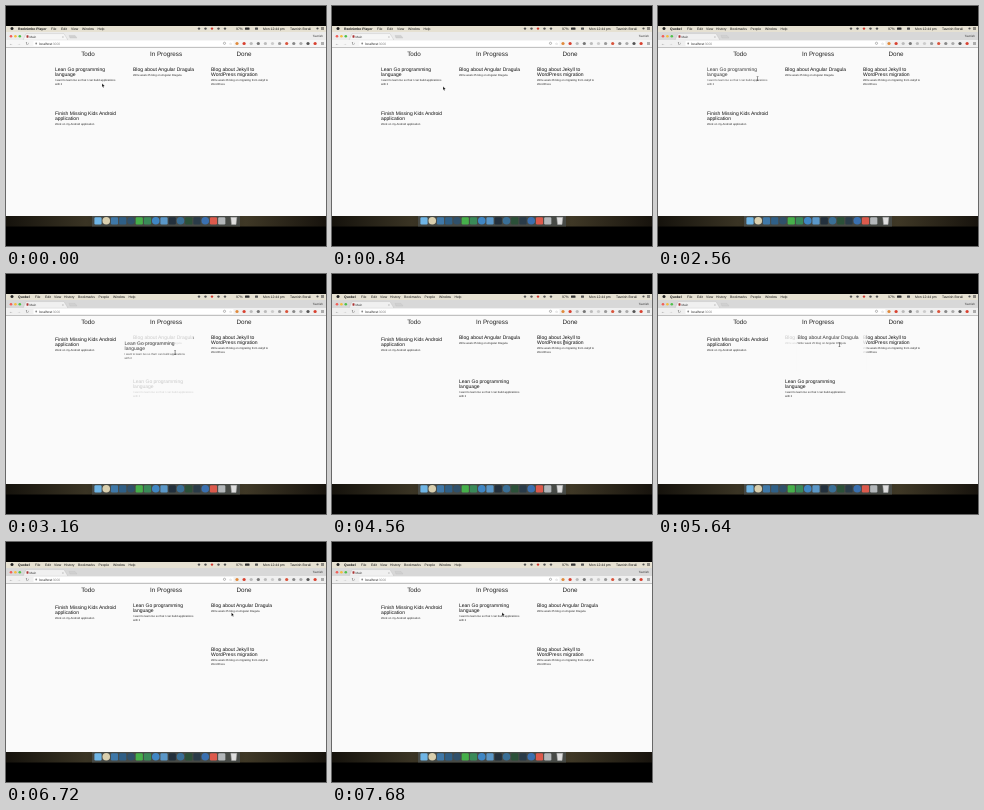
An HTML page with a canvas for the animation above (8000 ms loop, 320 px wide and 240 px high).

```html
<!DOCTYPE html>
<html lang="en">
<head>
<meta charset="utf-8">
<title>Drag and drop board</title>
<style>
html, body { margin: 0; height: 100%; overflow: hidden; background: #000; }
canvas { display: block; width: 320px; height: 240px; }
</style>
</head>
<body>
<canvas id="stage"></canvas>
<script>
const canvas = document.getElementById('stage');
const ratio = window.devicePixelRatio || 1;
canvas.width = 320 * ratio;
canvas.height = 240 * ratio;
const ctx = canvas.getContext('2d');
ctx.scale(ratio, ratio);
ctx.textRendering = 'geometricPrecision';

const LOOP = 8000, ACTIVATE = 880, SWAP_1 = 2770, SWAP_2 = 5760;
const PAGE = '#fafafa';

const go = { title: ['Lean Go programming', 'language'],
  note: ['I want to learn Go so that I can build applications', 'with it'] };
const kids = { title: ['Finish Missing Kids Android', 'application'],
  note: ['Work on my Android application'] };
const angular = { title: ['Blog about Angular Dragula'],
  note: ['Write week 25 blog on Angular Dragula'] };
const jekyll = { title: ['Blog about Jekyll to', 'WordPress migration'],
  note: ['Write week 26 blog on migrating from Jekyll to', 'WordPress'] };

const drags = [
  { card: go, from: 2520, to: 3480, home: [49, 63], grab: [99.5, 72.5] },
  { card: angular, from: 5440, to: 6480, home: [127, 63], grab: [169, 70] },
];

// time, x, y of the pointer
const path = [
  [40, 97, 79], [520, 112, 82], [840, 112, 82], [1480, 144, 80], [1760, 144, 80],
  [2520, 99.5, 72.5], [2600, 99.5, 72.5], [3140, 169, 78.5], [3400, 170, 78.5],
  [3800, 170, 78.5], [4320, 232, 68], [4560, 232, 68], [4680, 231, 69], [4840, 231, 69],
  [5280, 169, 70], [5480, 169, 70], [6020, 227, 72], [6280, 228, 72], [6640, 228, 72],
  [7440, 173, 73], [7680, 171, 72],
];

function pointerAt(t) {
  const next = path.findIndex(p => p[0] > t);
  if (next < 1) return path[next ? path.length - 1 : 0].slice(1);
  const [t0, x0, y0] = path[next - 1], [t1, x1, y1] = path[next];
  const u = (t - t0) / (t1 - t0), k = u * u * (3 - 2 * u);
  return [x0 + (x1 - x0) * k, y0 + (y1 - y0) * k];
}

function box(x, y, w, h, color, radius = 0) {
  ctx.fillStyle = color;
  ctx.beginPath();
  ctx.roundRect(x, y, w, h, radius);
  ctx.fill();
}

function dot(x, y, r, color) {
  ctx.fillStyle = color;
  ctx.beginPath();
  ctx.arc(x, y, r, 0, 7);
  ctx.fill();
}

function shape(points, fill, stroke, width = 0.5) {
  ctx.beginPath();
  points.forEach(([x, y]) => ctx.lineTo(x, y));
  ctx.closePath();
  ctx.fillStyle = fill;
  ctx.strokeStyle = stroke;
  ctx.lineWidth = width;
  ctx.fill();
  ctx.stroke();
}

// y is the middle of the line
function text(str, x, y, size, color = '#222', align = 'left', weight = '') {
  ctx.font = `${weight} ${size}px "Liberation Sans", Arial, sans-serif`;
  ctx.fillStyle = color;
  ctx.textAlign = align;
  ctx.fillText(str, x, y + size * 0.35);
}

function drawCard({ title, note }, x, y) {
  title.forEach((line, i) => text(line, x, y + i * 5.2, 5, '#111'));
  const noteY = y + 0.9 + title.length * 5.1;
  note.forEach((line, i) => text(line, x, noteY + i * 3.9, 2.8, '#222'));
}

function drawMenuBar(active) {
  box(0, 20, 320, 6, '#e6e1d2');
  dot(6, 22.6, 1.5, '#222');
  text(active ? 'Quobel' : 'Reelnimbo Player', 12, 22.6, 3.4, '#111', 'left', 'bold');
  const items = active
    ? [['File', 29], ['Edit', 39], ['View', 48], ['History', 58], ['Bookmarks', 72],
       ['People', 92.5], ['Window', 107], ['Help', 122.5]]
    : [['File', 45], ['Edit', 55], ['View', 65], ['Window', 76], ['Help', 91.5]];
  items.forEach(([label, x]) => text(label, x, 22.6, 3.4, '#111'));

  for (let i = 0; i < 5; i++) dot(193 + i * 6.5, 22.6, 1.2, i === 2 ? '#d0392f' : '#555');
  text('97%', 230, 22.6, 3.4, '#111');
  box(239, 21.4, 4.5, 2.4, '#333', 0.5);
  box(249, 21.4, 3, 2.4, '#555', 0.5);
  text('Mon 12:44 pm', 257, 22.6, 3.4, '#111');
  text('Tavnish Borali', 284, 22.6, 3.4, '#111');
  dot(311.5, 22.5, 1.1, '#555');
  for (let i = 0; i < 3; i++) box(315, 21.3 + i, 3, 0.5, '#333');
}

function drawBrowser(active) {
  box(0, 26, 320, 8, active ? '#d8d8d8' : '#ebebeb');
  ['#f25e57', '#f5bd3d', '#4fc14a'].forEach((c, i) => dot(5 + i * 4.4, 30.2, 1.3, c));
  const bar = active ? '#f0f0f0' : '#f6f6f6';
  shape([[17, 34.2], [20, 27.6], [58, 27.6], [62, 34.2]], bar, '#bbb', 0.4);
  box(20.5, 29.3, 2, 2.4, '#a33', 0.4);
  text('Main', 23.5, 30.6, 3.1, '#333');
  text('×', 56, 30.6, 3, '#666');
  shape([[64, 32], [63, 29.4], [69, 29.4], [71, 32]], '#d0d0d0', '#bbb', 0.3);
  text('Tavnish', 317, 30, 3, '#333', 'right');

  box(0, 34, 320, 7.4, bar);
  box(0, 41.2, 320, 0.4, '#bbb');
  text('←', 3, 37.5, 4, '#666');
  text('→', 11, 37.5, 4, '#aaa');
  text('↻', 19.5, 37.5, 4, '#666');
  box(27.5, 35.1, 200, 5, '#fff', 0.7);
  dot(30.2, 37.5, 0.9, '#888');
  text('localhost', 33, 37.6, 3.3, '#222');
  text(':3000', 45.8, 37.6, 3.3, '#888');
  text('☆', 223, 37.5, 3.5, '#777');
  ctx.strokeStyle = '#777';
  ctx.lineWidth = 0.5;
  ctx.beginPath();
  ctx.arc(218.5, 37.3, 1.1, 0, 7);
  ctx.stroke();
  const extensions = ['#e08a3c', '#d8402f', '#bbb', '#777', '#bbb', '#ccc', '#999',
    '#d8543c', '#888', '#aaa', '#555', '#d8402f'];
  extensions.forEach((c, i) => dot(231 + i * 7.1, 37.5, 1.6, c));
  for (let i = 0; i < 3; i++) box(315, 36.2 + i * 1.1, 3, 0.5, '#666');
}

function drawDock() {
  const ground = ctx.createLinearGradient(0, 0, 320, 0);
  ['#15120c', '#3a3424', '#242017', '#3f3826', '#17130d'].forEach((c, i) => ground.addColorStop(i / 4, c));
  box(0, 210, 320, 10.5, ground);
  box(86, 210, 148, 10.5, '#474a46');
  const icons = ['#6fb5e6', '#d9cfae', '#3f78a8', '#2f5f86', '#30506a', '#46b04a', '#3a8a58', '#3f86c4',
    '#5a97c8', '#23303c', '#3a6f96', '#2b5038', '#2a3b48', '#3a70b0', '#dc5a4c', '#b3b7ba'];
  icons.forEach((c, i) => {
    const x = 92 + i * 8.25;
    if (i % 3 === 1) dot(x, 214.8, 3.8, c);
    else box(x - 3.6, 211.2, 7.2, 7.2, c, 1.2);
  });
  shape([[224.8, 211.3], [230.8, 211.3], [230, 218.5], [225.6, 218.5]], '#dedede', '#aaa');
}

function drawBoard(t, pointer) {
  const drag = drags.find(d => t >= d.from && t < d.to);
  const moved1 = t >= SWAP_1, moved2 = t >= SWAP_2;
  const columns = [
    { name: 'Todo', top: moved1 ? 65 : 63, cards: moved1 ? [kids] : [go, kids] },
    { name: 'In Progress', top: 63, cards: moved2 ? [go] : moved1 ? [angular, go] : [angular] },
    { name: 'Done', top: 63, cards: moved2 ? [angular, jekyll] : [jekyll] },
  ];
  box(0, 41.6, 320, 168.4, PAGE);
  columns.forEach(({ name, top, cards }, col) => {
    text(name, 82 + col * 78, 48.2, 6.3, '#222', 'center');
    cards.forEach((card, row) => {
      ctx.globalAlpha = drag && drag.card === card ? 0.2 : 1;
      drawCard(card, 49 + col * 78, top + row * 44);
      ctx.globalAlpha = 1;
    });
  });
  if (drag) {
    const [x, y] = drag.home.map((h, i) => h + pointer[i] - drag.grab[i]);
    ctx.globalAlpha = 0.8;
    box(x - 0.5, y - 8, 69.5, 42, PAGE);
    drawCard(drag.card, x, y);
    ctx.globalAlpha = 1;
  }
  return drag;
}

function drawPointer(t, [x, y], dragging) {
  ctx.save();
  ctx.translate(x, y);
  if (dragging || (t > 4250 && t < 4900)) {
    box(-0.2, -1.8, 0.5, 4, '#333');
    box(-0.9, -2, 1.9, 0.4, '#333');
    box(-0.9, 2, 1.9, 0.4, '#333');
  } else {
    shape([[-1, -1.6], [-1, 2.2], [-0.1, 1.4], [0.6, 2.8], [1.1, 2.5], [0.5, 1.2], [1.7, 1.1]],
      '#000', '#fff', 0.3);
  }
  ctx.restore();
}

function render(now) {
  const t = now % LOOP;
  const active = t >= ACTIVATE;
  const pointer = pointerAt(t);
  box(0, 0, 320, 240, '#000');
  drawMenuBar(active);
  drawBrowser(active);
  const drag = drawBoard(t, pointer);
  drawDock();
  drawPointer(t, pointer, drag);
}

const start = performance.now();
function tick() {
  render(performance.now() - start);
  requestAnimationFrame(tick);
}
tick();
</script>
</body>
</html>
```
